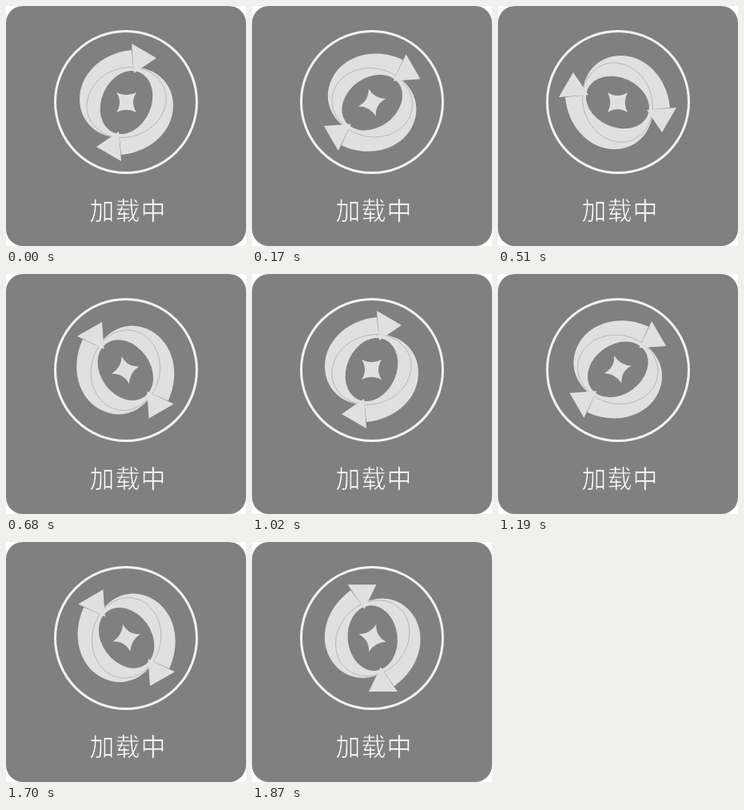
These frames come from a looping animation (300 px wide and 300 px high, 2040 ms). An HTML page:

```html
<!DOCTYPE html>
<html lang="zh-CN">
<head>
<meta charset="utf-8">
<title>加载中</title>
<style>
  html, body { margin: 0; width: 100%; height: 100%; overflow: hidden; background: #fff; }
  svg { display: block; width: 100%; height: 100%; }
  /* The grey outline thins the strokes of the glyphs. */
  text {
    font: 300 31px "Noto Sans CJK SC", "Noto Sans CJK", sans-serif;
    letter-spacing: 1px; fill: #fff; stroke: #808080; stroke-width: .7;
  }
</style>
</head>
<body>
<svg viewBox="0 0 300 300">
  <defs>
    <path id="blade" d="M6.5-65.5C-33.6-61.5-58.5-33-58.5-4.5C-58.5 25-36 44-8 44L9.5-36.5Z"/>
    <path id="head" d="M6.5-73.5L37.5-55.5L9.5-36.5Z"/>
  </defs>
  <rect width="300" height="300" rx="21" fill="#808080"/>
  <circle cx="150" cy="120" r="88.5" fill="none" stroke="#f2f2f2" stroke-width="3"/>
  <g id="spinner" fill="#e0e0e0">
    <use href="#blade"/>
    <use href="#blade" transform="rotate(180)"/>
    <ellipse rx="50.5" ry="43" transform="rotate(-20)" stroke="#808080" stroke-width=".4"/>
    <ellipse rx="31" ry="41" transform="rotate(24)" fill="#808080"/>
    <use href="#head"/>
    <use href="#head" transform="rotate(180)"/>
    <path d="M-12.5-12.5Q0-6 12.5-12.5Q4.5 0 12.5 12.5Q0 6-12.5 12.5Q-4.5 0-12.5-12.5Z"/>
  </g>
  <text x="104.5" y="267">加载中</text>
</svg>
<script>
  const STEP = 170, TURN = 30;
  const spinner = document.getElementById("spinner");
  const start = performance.now();

  function draw(now) {
    const angle = Math.floor(Math.max(0, now - start) / STEP) % 12 * TURN;
    // The half-pixel shift makes the icon wobble slightly as it turns.
    spinner.setAttribute("transform", `translate(150 120) rotate(${angle}) translate(.5 .5)`);
    requestAnimationFrame(draw);
  }
  draw(start);
</script>
</body>
</html>
```
